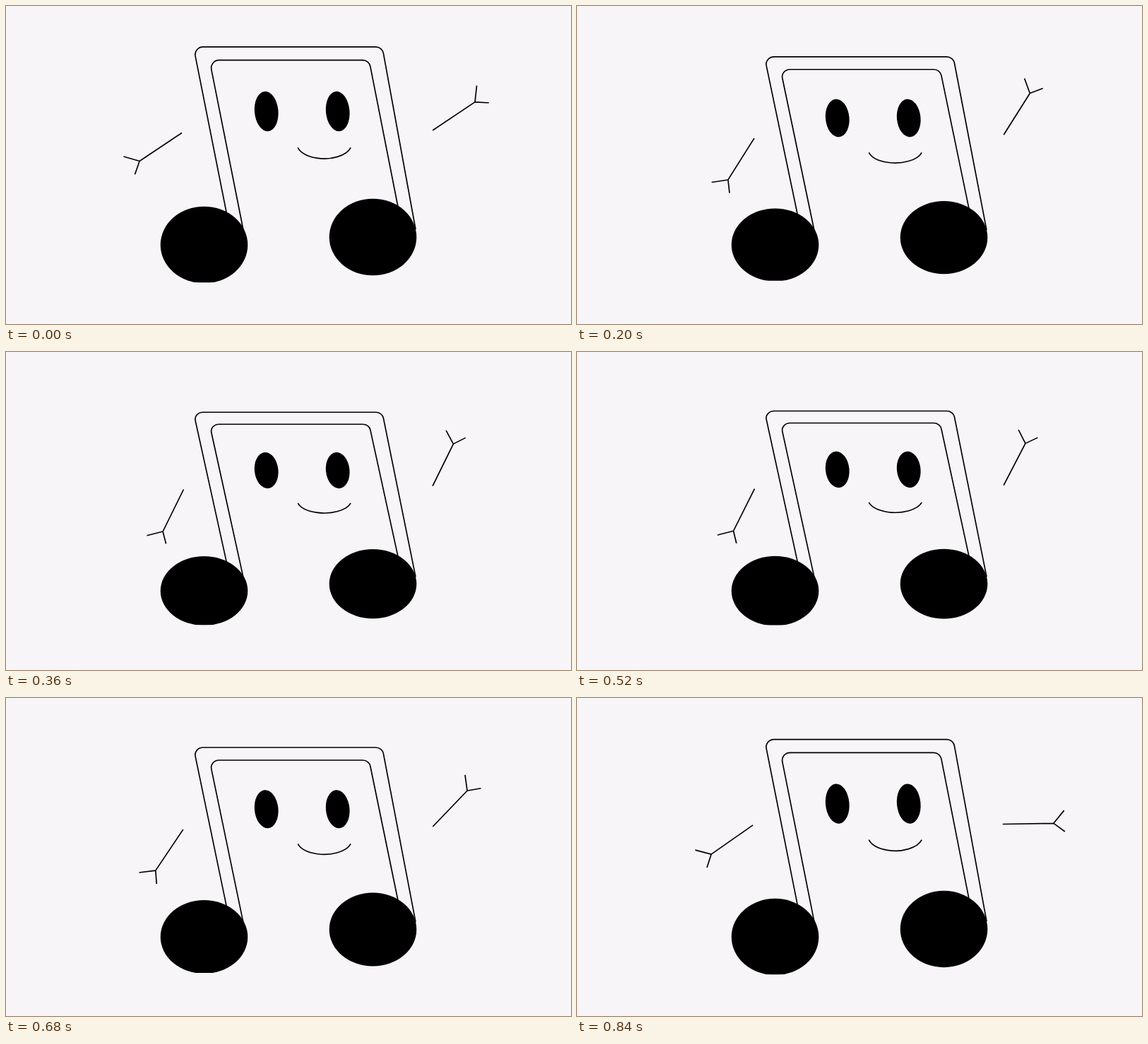
Animation of 800 by 450 pixels, one loop 880 ms. Source, as an HTML page with a canvas:

```html
<!DOCTYPE html>
<html lang="en">
<head>
<meta charset="utf-8">
<title>Dancing note</title>
<style>
  html, body { margin: 0; width: 100%; height: 100%; overflow: hidden; background: #f7f5f8; }
  canvas { display: block; width: 800px; height: 450px; }
</style>
</head>
<body>
<canvas id="stage" width="800" height="450"></canvas>
<script>
const ctx = document.getElementById('stage').getContext('2d');
const LOOP = 880, STEP = 40;
const DOWN_END = 400, UP_START = 440;
const BASE_Y = 338.5, SQUASH = 0.1;
const REST = 33.8, RAISE = 32.4, DROP = 35.5;   // arm angles in degrees

const rad = degrees => degrees * Math.PI / 180;
const clamp = x => Math.min(1, Math.max(0, x));
const mix = (a, b, k) => a + (b - a) * k;
const smooth = s => s * s * (3 - 2 * s);

// Cubic bezier easing (x1, 0, x2, 1), solved by bisection.
function ease(x, x1, x2) {
  let lo = 0, hi = 1;
  for (let i = 0; i < 24; i++) {
    const s = (lo + hi) / 2, r = 1 - s;
    if (3 * r * r * s * x1 + 3 * r * s * s * x2 + s * s * s < x) lo = s;
    else hi = s;
  }
  return smooth(lo);
}

function disc(x, y, rx, ry, tilt = 0) {
  ctx.beginPath();
  ctx.ellipse(x, y, rx, ry, tilt, 0, Math.PI * 2);
  ctx.fill();
}

// Leaning bracket whose legs end behind the note heads.
function bracket(top, left, right, rightFoot) {
  ctx.beginPath();
  ctx.moveTo(left + 0.199 * (319 - top), 319);
  ctx.arcTo(left, top, right, top, 11);
  ctx.arcTo(right, top, rightFoot, 316, 11);
  ctx.lineTo(rightFoot, 316);
  ctx.stroke();
}

// An arm along the x axis, turned about its pivot; side -1 mirrors it.
function arm(x, y, degrees, side) {
  const wrist = 75, offset = 3.4;
  const finger = (angle, length) => {
    ctx.moveTo(wrist, offset);
    ctx.lineTo(wrist + length * Math.cos(rad(angle)), offset + length * Math.sin(rad(angle)));
  };
  ctx.save();
  ctx.translate(x, y);
  ctx.rotate(rad(degrees));
  ctx.scale(1, side);
  ctx.beginPath();
  ctx.moveTo(2.9, offset);
  ctx.lineTo(wrist, offset);
  finger(-50, 23.5);
  finger(37, 19.8);
  ctx.stroke();
  ctx.restore();
}

function draw(t) {
  const rising = t >= UP_START;
  const pose = rising ? (LOOP - t) / (LOOP - UP_START) : clamp(t / DOWN_END);
  const lift = ease(pose, 0.29, 0.24);

  ctx.fillStyle = '#f7f5f8';
  ctx.fillRect(0, 0, 800, 450);

  ctx.save();
  ctx.translate(0, BASE_Y);
  ctx.scale(1, 1 - SQUASH * smooth(pose));
  ctx.translate(0, -BASE_Y);
  ctx.beginPath();
  ctx.rect(0, 0, 800, 391.3);
  ctx.clip();

  ctx.fillStyle = ctx.strokeStyle = '#000';
  ctx.lineWidth = 1.7;

  bracket(57.9, 265.5, 532.7, 580);
  bracket(76.7, 288.2, 514.1, 561.3);
  disc(280.5, 338, 61.8, 54.3);
  disc(519.5, 327, 61.8, 54.3);

  for (const x of [368.7, 469.7]) disc(x, 149.1, 16.8, 28.3, -0.09);
  ctx.beginPath();
  ctx.ellipse(450.7, 194.3, 39, 21.7, 0, 0.283, Math.PI - 0.283);
  ctx.stroke();

  // The right arm drops past its starting pose, then snaps back on the loop.
  arm(249.5, 175, 180 - REST - RAISE * lift, -1);
  arm(599.8, 174.8, -REST - mix(rising ? -DROP : 0, RAISE, lift), 1);
  ctx.restore();
}

function tick() {
  const t = performance.now() % LOOP;
  draw(Math.floor(t / STEP) * STEP);
  requestAnimationFrame(tick);
}
tick();
</script>
</body>
</html>
```
